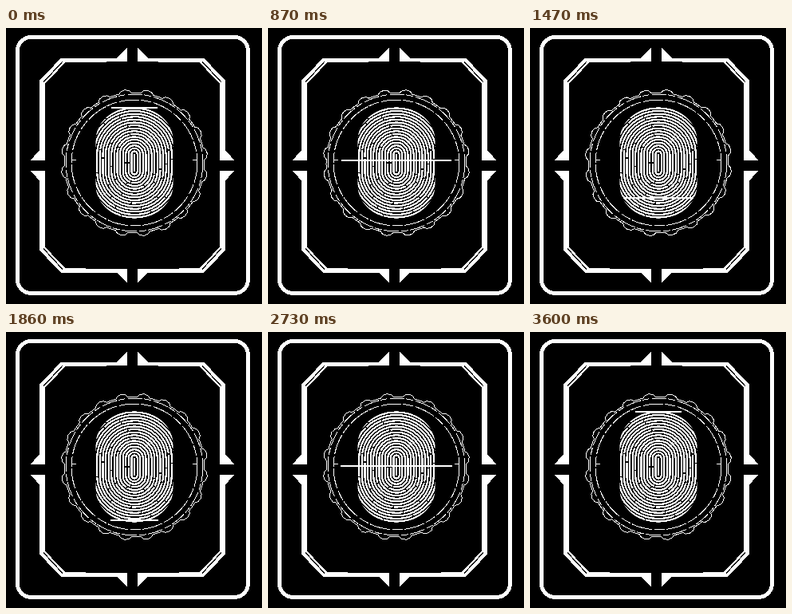
Recreate the animation shown at these times as an HTML page. Size 321 by 346 pixels, loop 3630 ms.

```html
<!DOCTYPE html>
<html lang="en">
<head>
<meta charset="utf-8">
<title>Fingerprint scan</title>
<style>
  html, body { margin: 0; width: 100%; height: 100%; overflow: hidden; background: #000; }
  svg { display: block; width: 321px; height: 346px; }
</style>
</head>
<body>
<svg viewBox="0 0 321 346" fill="none" stroke="#fff" shape-rendering="crispEdges">
  <defs>
    <g id="corner">
      <path fill="#fff" stroke="none" d="M152 25L139 37.500H69L42 66V153L31 165.500H49V70L74 43.500L152 42Z"/>
      <path stroke="#000" stroke-width="1.300" d="M47 68L71 42"/>
    </g>
    <clipPath id="outline"><rect x="-48.500" y="-70" width="97" height="140" rx="48.500" ry="42"/></clipPath>
  </defs>
  <rect x="14.500" y="11.500" width="289" height="321" rx="17" stroke-width="4.800"/>
  <use href="#corner"/>
  <use href="#corner" transform="matrix(-1 0 0 1 317 0)"/>
  <use href="#corner" transform="matrix(1 0 0 -1 0 344.500)"/>
  <use href="#corner" transform="matrix(-1 0 0 -1 317 344.500)"/>
  <g transform="translate(161 169)">
    <path id="gear"/>
    <circle r="86" stroke-dasharray="19 2 9 3"/>
    <circle r="79" stroke-dasharray="26 2 13 3"/>
    <path d="M-79-3.500h6M73-3.500h6"/>
    <g id="print" stroke-width="2.200" clip-path="url(#outline)"/>
  </g>
  <path id="scan" stroke-width="2"/>
</svg>
<script>
const LOOP = 3630, STEP = 30, LAST = 119, TEETH = 20, RIDGES = 17, GAP = 3.6;
const $ = id => document.getElementById(id);

function polar(radius, degrees) {
  const a = degrees * Math.PI / 180;
  return (radius * Math.cos(a)).toFixed(2) + ' ' + (radius * Math.sin(a)).toFixed(2);
}

function gearPath() {
  const points = [];
  for (let i = 0; i < TEETH; i++) {
    const mid = i * 360 / TEETH + 9;
    for (const [r, offset] of [[88, -9], [88, -5], [91, -3.2], [92, 0], [91, 3.2], [88, 5]])
      points.push(polar(r, mid + offset));
  }
  return 'M' + points.join('L') + 'Z';
}

// Evenly spaced ridges around a short upright core, trimmed to the outline
function ridges() {
  let out = '<path d="M0-11V11"/>';
  for (let i = 1; i < RIDGES; i++) {
    const w = i * GAP, h = w + 11;
    const dash = i > 1 ? `${61 + i * 17 % 29} 1.4` : 'none';
    out += `<rect x="${-w}" y="${-h}" width="${2 * w}" height="${2 * h}" rx="${w}" stroke-dasharray="${dash}"/>`;
  }
  return out;
}

function draw(now) {
  const n = Math.max(0, Math.floor(now % LOOP / STEP) - 1);
  const sweep = 1 - Math.abs(2 * n / LAST - 1);
  const y = 100 + 140 * sweep;
  const half = 70.5 - 0.6 * Math.abs(y - 169);
  $('scan').setAttribute('d', `M${161 - half} ${y}h${2 * half}`);
  const sway = 1.9 * Math.cos(2 * Math.PI * (n - 106) / LAST);
  $('gear').setAttribute('transform', `rotate(${sway})`);
  requestAnimationFrame(() => draw(performance.now()));
}

$('gear').setAttribute('d', gearPath());
$('print').innerHTML = ridges();
draw(performance.now());
</script>
</body>
</html>
```
